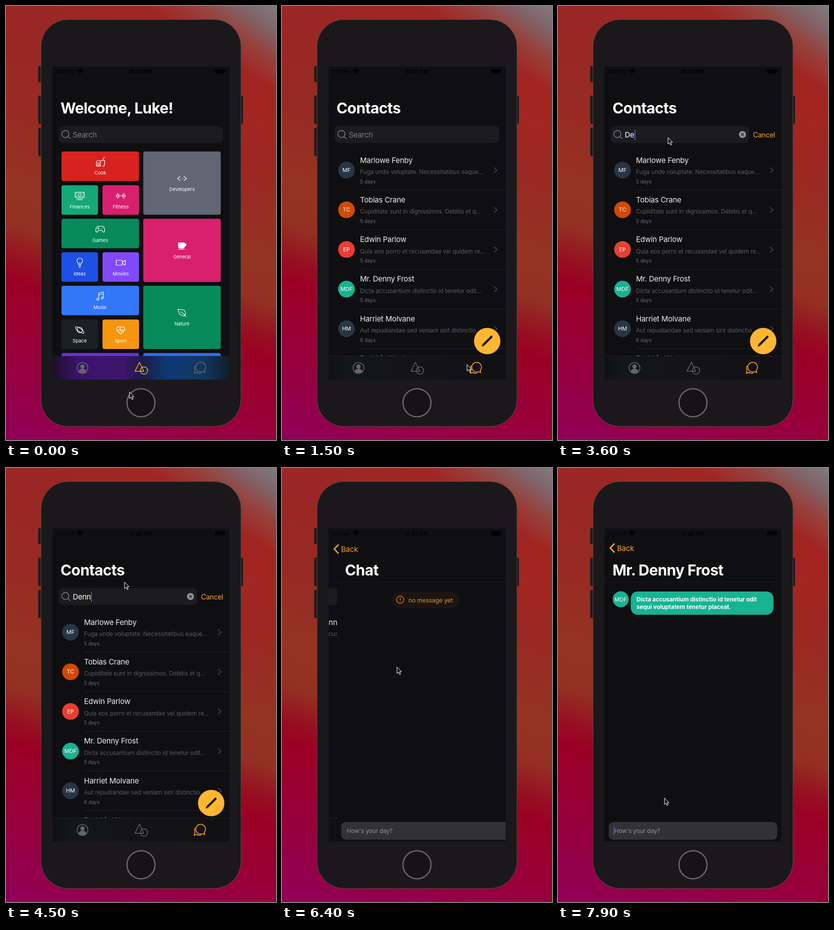
These frames come from a looping animation (540x868 px, 8000 ms). An HTML page:

```html
<!DOCTYPE html>
<html lang="en">
<head>
<meta charset="utf-8">
<title>Contacts app</title>
<style>
html, body { margin: 0; width: 100%; height: 100%; overflow: hidden; }
body {
  background:
    linear-gradient(214.5deg, #81797e 0, #80656a 4%, #90504aa0 9%, #9a3a3600 14%),
    radial-gradient(circle at 510px 200px, #ac231f90 0, #a8222200 200px),
    linear-gradient(197deg, #a42826 0, #9a2725 16%, #982a24 35%, #953422 50%,
      #943023 58%, #970d22 65%, #9b0024 69%, #98003a 82%, #900058 100%);
}
svg { display: block; width: 540px; height: 868px; font-family: Inter, "Open Sans", sans-serif; }
.title { font: 700 30px Inter, "Open Sans", sans-serif; letter-spacing: -.6px; fill: #fff; }
.name { font-size: 15px; letter-spacing: -.25px; fill: #eee; }
.preview { font-size: 12px; letter-spacing: -.2px; fill: #5a595d; }
.days { font-size: 10px; fill: #6b6a6e; }
.field { font-size: 15px; letter-spacing: -.3px; }
.label { font-size: 9.5px; fill: #fff; text-anchor: middle; }
.init { font-size: 11px; fill: #fff; text-anchor: middle; }
.icon { fill: none; stroke: #fff; stroke-width: 1.2; stroke-linecap: round; stroke-linejoin: round; }
.tab { fill: none; stroke: #666568; stroke-width: 1.5; stroke-linejoin: round; }
.on { stroke: #ffab2e; }
.status { font-size: 11px; fill: #030304; }
</style>
</head>
<body>
<svg viewBox="0 0 540 868">
  <defs>
    <clipPath id="screen"><rect x="93" y="121" width="354" height="626"/></clipPath>
    <linearGradient id="glow">
      <stop offset="0" stop-color="#1b1026"/><stop offset=".14" stop-color="#39136a"/>
      <stop offset=".4" stop-color="#40156c"/><stop offset=".5" stop-color="#1b1d48"/>
      <stop offset=".66" stop-color="#0d3a74"/><stop offset=".86" stop-color="#12365f"/>
      <stop offset="1" stop-color="#111c2b"/>
    </linearGradient>
    <linearGradient id="dim">
      <stop offset="0" stop-color="#111013"/><stop offset=".1" stop-color="#10181c"/>
      <stop offset=".4" stop-color="#141417"/><stop offset="1" stop-color="#111013"/>
    </linearGradient>
  </defs>

  <g fill="#1c1a1d" stroke="#1f1617">
    <rect x="65" y="120.5" width="8" height="31.5" rx="2"/>
    <rect x="65" y="179.5" width="8" height="56" rx="2"/>
    <rect x="65" y="244" width="8" height="56" rx="2"/>
    <rect x="466" y="179.5" width="7.5" height="56" rx="2"/>
  </g>
  <rect x="70" y="27" width="400" height="814" rx="54" fill="#1a181b" stroke="#5f4a42"/>
  <circle cx="270" cy="793.5" r="28" fill="#151316" stroke="#68666a" stroke-width="2.6"/>
  <rect x="93" y="121" width="354" height="626" fill="#0f0e11"/>

  <g clip-path="url(#screen)">
    <g id="old">
      <g id="tiles"></g>
      <g id="list"></g>
      <rect id="box" x="105.5" y="240" width="329" height="34" rx="9" fill="#1c1b1e"/>
      <g fill="none" stroke="#858488" stroke-width="1.4" stroke-linecap="round">
        <circle cx="118.8" cy="256" r="7"/><path d="M124 261l4.5 4.5"/>
      </g>
      <text id="query" class="field" x="133.5" y="262.5"></text>
      <rect id="caret" y="248" width="1.8" height="20" fill="#3c5bea"/>
      <g id="clear"><circle cx="369" cy="257" r="7" fill="#929196"/>
        <path d="M366.5 254.5l5 5m0-5l-5 5" stroke="#1c1b1e" stroke-width="1.3"/></g>
      <text id="cancel" y="262.5" font-size="14" letter-spacing="-.3" fill="#f5a534">Cancel</text>
      <rect id="bar" x="93" y="700" width="354" height="47"/>
      <path id="barline" d="M93 700h354" stroke="#222125"/>
      <g class="tab">
        <circle cx="153" cy="724" r="10.8"/><circle cx="153" cy="721" r="3.6" fill="#666568"/>
        <path d="M146 731q1.5-5 7-5t7 5q-7 5-14 0z" fill="#666568"/>
      </g>
      <g id="shapes" class="tab"><path d="M258 730.5l9-18 8.5 18z"/><circle cx="276" cy="729" r="7.3"/></g>
      <g id="chats" class="tab">
        <path d="M382 729a9.8 9.8 0 1 1 14.5 0l1 4-4.5-1.5q-6 2-11-2.5z"/>
        <path d="M378.5 719.5q-2.5 4-.5 8.500l-1.5 6.500 5-1.500q4.500 2.500 9 1"/>
      </g>
      <g id="fab"><circle cx="410.4" cy="670.2" r="26.4" fill="#ffb632"/>
        <path d="M403 677.5l12-12" stroke="#16120c" stroke-width="4.5"/>
        <path d="M416.2 664.3l2.6-2.6" stroke="#16120c" stroke-width="4.5" stroke-linecap="round"/>
        <path d="M399.5 681l1.5-5 3.5 3.5z" fill="#16120c"/></g>
    </g>
    <text id="head" class="title" x="109" y="215"></text>

    <g id="chat">
      <rect x="93" y="140" width="354" height="607" fill="#0f0e11"/>
      <path d="M93 228.5h354" stroke="#1a191c"/>
      <text id="chatHead" class="title" x="109" y="214.5"></text>
      <g id="empty">
        <rect x="203" y="248" width="134" height="32" rx="16" fill="#1d1511"/>
        <circle cx="219.5" cy="263.5" r="7.3" fill="none" stroke="#e8902a" stroke-width="1.2"/>
        <path d="M219.5 259.5v5m0 2v1.5" stroke="#e8902a" stroke-width="1.4"/>
        <text x="236" y="268.5" font-size="12" letter-spacing="-.1" fill="#e09432">no message yet</text>
      </g>
      <g id="message">
        <circle cx="125.5" cy="262.5" r="16" fill="#18b391"/>
        <text class="init" x="125.5" y="266.5">MDF</text>
        <rect x="145.5" y="247" width="285.5" height="46.5" rx="14" fill="#18b391"/>
        <g font-size="11.5" font-weight="700" fill="#fff">
          <text x="157" y="266.5">Dicta accusantium distinctio id tenetur odit</text>
          <text x="157" y="281.5">sequi voluptatem tenetur placeat.</text>
        </g>
      </g>
      <rect x="101.5" y="708" width="337" height="35.5" rx="9" fill="#323235"/>
      <text x="112.5" y="730" font-size="12" letter-spacing="-.2" fill="#929196">How's your day?</text>
      <rect id="inputCaret" x="111" y="717" width="1.5" height="17" fill="#4553d8"/>
    </g>
    <g id="back">
      <path d="M113 151l-8.5 9 8.500 9" fill="none" stroke="#f9a52c" stroke-width="2.7"/>
      <text x="118" y="165.5" class="field" fill="#f9a52c">Back</text>
    </g>

    <g class="status">
      <text x="100" y="135">Carrier</text>
      <path d="M141 128q7-6 14 0l-7 8z"/>
      <text x="270" y="135" text-anchor="middle" font-weight="700">8:26 PM</text>
      <rect x="418" y="126" width="20" height="9" rx="2.5"/>
    </g>
  </g>

  <path id="cursor" d="M0 0v13l3-2.7 2.2 4.700 2-.9-2.1-4.600h4z" fill="#111" stroke="#fff"/>
</svg>

<script>
const $ = id => document.getElementById(id);
const LOOP = 8000;

// x, y, width, height, colour, label, icon
const L = 111, M = 193, R = 274.5, WIDE = 155, HALF = 73, LOW = 59, TALL = 126.5;
const tiles = [
  [L, 291, WIDE, LOW, '#d82220', 'Cook', 'M1-3h8l-1 11h-4M5-3l2-6h2M-8 2q0-5 4.5-5t4.500 5zM-9 4.500h10M-8 6.500q0 2 2 2h5q2 0 2-2z'],
  [R, 291, WIDE, TALL, '#616574', 'Developers', 'M-4-4l-5 4 5 4M4-4l5 4-5 4M-2.5 0h.1M0 0h.1M2.5 0h.1'],
  [L, 358.5, HALF, LOW, '#14a877', 'Finances', 'M-9-7h18v10h-18zM-7 5.5h14M-5 8h10M3-2a3 3 0 1 1-6 0a3 3 0 1 1 6 0M-7-5h1M6-5h1M-7 1h1M6 1h1'],
  [M, 358.5, HALF, LOW, '#d8206c', 'Fitness', 'M-9-2v4M-6.5-5v10M-4-3.500v7M-4 0h8M4-3.500v7M6.500-5v10M9-2v4'],
  [L, 425.5, WIDE, LOW, '#078a5b', 'Games', 'M-5-6h10q3.5 1 4 9q-1 4-4 2l-2-3h-6l-2 3q-3 2-4-2q.5-8 4-9zM-5.500-2h4M-3.500-4v4M3-1h.1M5-3h.1'],
  [R, 425.5, WIDE, TALL, '#d8206c', 'General', 'M-7-6h12v7q0 4-4 4h-4q-4 0-4-4zM5-4h3q1 5-3 5M-7 7h12', 1],
  [L, 492.5, HALF, LOW, '#1d50e4', 'Ideas', 'M-2 5q0-3-2-5a5.5 5.500 0 1 1 8 0q-2 2-2 5zM-2 7.500h4M-1 9.500h2M0 4v-5'],
  [M, 492.5, HALF, LOW, '#8149f9', 'Movies', 'M-8-5h10q1 0 1 1v8q0 1-1 1h-10q-1 0-1-1v-8q0-1 1-1zM3-1l6-4v10l-6-4'],
  [L, 559.5, WIDE, LOW, '#3277f7', 'Music', 'M-3 6v-12l9-2.5v12M-3-2.500l9-2.500M-3 6a2 2 0 1 1-4 0a2 2 0 1 1 4 0M6 3.500a2 2 0 1 1-4 0a2 2 0 1 1 4 0'],
  [R, 559.5, WIDE, TALL, '#078a5b', 'Nature', 'M-8-7q15 0 15 7q0 7-5 6q-9-1-10-13zM-3-2q5 2 11 10'],
  [L, 627, HALF, LOW, '#1b2026', 'Space', 'M5.5 0a5.500 5.500 0 1 1-11 0a5.500 5.500 0 1 1 11 0M-8.200-5.700a10 3 35 1 0 16.400 11.400a10 3 35 1 0-16.400-11.400'],
  [M, 627, HALF, LOW, '#f6960f', 'Sport', 'M0 8l-7-7a4.5 4.500 0 0 1 7-6a4.500 4.500 0 0 1 7 6zM-8 0h5l2-3 2 6 2-3h5'],
  [L, 694, WIDE, LOW, '#6830dc'],
  [R, 694, WIDE, TALL, '#2c6cf0'],
];
$('tiles').innerHTML = tiles.map(([x, y, w, h, color, label, icon, solid]) => {
  const cx = x + w / 2, iy = y + (h > LOW ? 54 : 21);
  return `<rect x="${x}" y="${y}" width="${w}" height="${h}" rx="4" fill="${color}"/>` + (label ?
    `<path class="icon" d="${icon}" transform="translate(${cx} ${iy})"${solid ? ' style="fill:#fff"' : ''}/>
     <text class="label" x="${cx}" y="${iy + 25}">${label}</text>` : '');
}).join('');

const people = [
  ['Marlowe Fenby', 'MF', '#283545', 'Fuga unde voluptate. Necessitatibus eaque...', 5],
  ['Tobias Crane', 'TC', '#d04a04', 'Cupiditate sunt in dignissimos. Debitis et q...', 5],
  ['Edwin Parlow', 'EP', '#e64034', 'Quia eos porro et recusandae vel quidem re...', 5],
  ['Mr. Denny Frost', 'MDF', '#18b391', 'Dicta accusantium distinctio id tenetur odit...', 5],
  ['Harriet Molvane', 'HM', '#283545', 'Aut repudiandae sed veniam sint distinctio...', 6],
  ['Dr. Idris Wexley', 'DIW', '#283545', '', 6],
];
$('list').innerHTML = people.map(([name, init, color, preview, days], i) =>
  `<g transform="translate(0 ${i * 79.3})">
    <circle cx="129" cy="328.3" r="16.7" fill="${color}"/>
    <text class="init" x="129" y="332">${init}</text>
    <text class="name" x="156" y="313.5">${name}</text>
    <text class="preview" x="156" y="336">${preview}</text>
    <text class="days" x="156" y="354.5">${days} days</text>
    <path d="M424 323l6 5.5-6 5.500" fill="none" stroke="#4b4a4e" stroke-width="1.5"/>
    <path class="rule" d="M156 368h291" stroke="#242327"/>
  </g>`).join('');
const rows = [...$('list').children], MATCH = 3;

// time, x, y
const path = [
  [0, 247, 772], [400, 247, 772], [1100, 373, 722], [1500, 370, 717], [1800, 370, 717],
  [2400, 222, 263], [2800, 220, 263], [4100, 220, 263], [4500, 237, 228], [4900, 237, 228],
  [5600, 213, 333], [6050, 213, 333], [6400, 230, 398], [6700, 230, 398],
  [7350, 206, 718], [7550, 206, 718], [7900, 213, 660], [LOOP, 213, 660],
];
const OPEN = 1200, FOCUS = 2400, FILTER = 4800, PUSH = 6050, LOADED = 6800, REPLY = 7400;
const keys = [3300, 3600, 3850, 4050];

const show = (id, on) => $(id).style.display = on ? '' : 'none';
const set = (id, attrs) => { for (const k in attrs) $(id).setAttribute(k, attrs[k]); };
const ease = p => (p = Math.min(1, Math.max(0, p)), p * p * (3 - 2 * p));
const blink = t => t >= 0 && t % 1000 < 650;

function pointer(t) {
  const i = path.findIndex(p => p[0] > t), [t0, x0, y0] = path[i - 1], [t1, x1, y1] = path[i];
  const p = ease((t - t0) / (t1 - t0));
  return `translate(${x0 + (x1 - x0) * p} ${y0 + (y1 - y0) * p})`;
}

function draw(t) {
  const contacts = t >= OPEN, filtered = t >= FILTER, loaded = t >= LOADED;
  show('tiles', !contacts);
  show('list', contacts);
  show('fab', contacts);
  show('barline', contacts);
  set('bar', { fill: !contacts ? 'url(#glow)' : filtered ? '#111013' : 'url(#dim)' });
  $('shapes').classList.toggle('on', !contacts);
  $('chats').classList.toggle('on', contacts);
  $('head').textContent = contacts ? 'Contacts' : 'Welcome, Luke!';

  rows.forEach((row, i) => {
    row.style.display = filtered && i !== MATCH ? 'none' : '';
    row.setAttribute('transform', `translate(0 ${filtered ? 0 : i * 79.3})`);
    row.querySelector('.rule').style.display = filtered ? 'none' : '';
  });

  const focus = ease((t - FOCUS + 100) / 300);
  set('box', { width: 329 - 52 * focus });
  set('cancel', { x: 447 - 57 * focus, opacity: focus });
  const typed = 'Denn'.slice(0, keys.filter(k => t >= k).length);
  $('query').textContent = typed || 'Search';
  set('query', { fill: typed ? '#fff' : '#7e7d82' });
  show('clear', typed);
  show('caret', blink(t - (keys.findLast(k => t >= k) || FOCUS)));
  set('caret', { x: typed ? 134 + $('query').getComputedTextLength() : 133.5 });

  // critically damped push to the chat page
  const s = Math.max(0, t - PUSH) * .0137;
  const rest = t > 7000 ? 0 : (1 + s) * Math.exp(-s);
  set('old', { transform: `translate(${-113 * (1 - rest)} 0)` });
  set('head', { opacity: Math.max(0, rest * 1.1 - .1) });
  show('chat', t > PUSH);
  set('chat', { transform: `translate(${354 * rest} 0)` });
  set('back', { opacity: 1 - rest, transform: `translate(0 ${loaded ? 0 : 2})` });
  $('chatHead').textContent = loaded ? 'Mr. Denny Frost' : 'Chat';
  show('empty', !loaded);
  show('message', loaded);
  show('inputCaret', blink(t - REPLY));
  set('cursor', { transform: pointer(t) });
}

const start = performance.now();
function tick() {
  const t = (performance.now() - start) % LOOP;
  draw(Math.floor(t / 100) * 100);
  requestAnimationFrame(tick);
}
tick();
</script>
</body>
</html>
```
